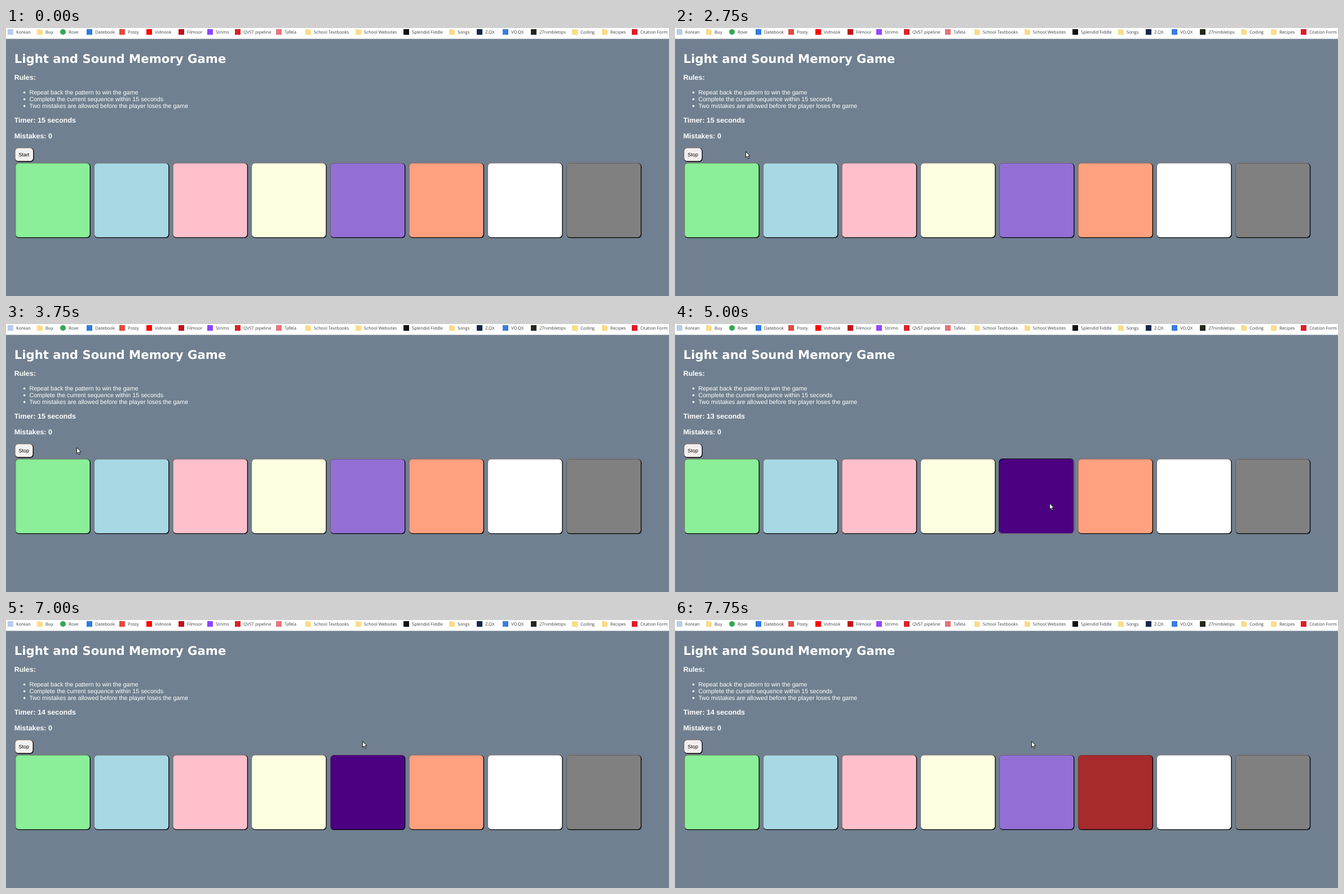
Write an HTML page that moves like this. It is 1176 px wide and 476 px high and loops after 8 s.

```html
<!DOCTYPE html>
<html lang="en">
<head>
<meta charset="utf-8">
<title>Memory Game</title>
<style>
  html, body { margin: 0; height: 100%; overflow: hidden; background: #708090; }
  svg { display: block; width: 1176px; height: 476px; }
  text { fill: #fff; text-rendering: geometricPrecision; white-space: pre; }
  .mark { font: 7.7px "Open Sans", "Noto Sans", sans-serif; fill: #3c4043; }
  .title { font: bold 21.24px "DejaVu Sans", sans-serif; }
  .head { font: bold 12.48px "Liberation Sans", Arial, sans-serif; }
  .rule { font: 10.72px "Liberation Sans", Arial, sans-serif; }
  .label { font: 8.89px "Liberation Sans", Arial, sans-serif; fill: #000; }
</style>
</head>
<body>
<svg id="stage" viewBox="0 0 1176 476"></svg>
<script>
const LOOP = 8000;
const stage = document.getElementById('stage');

function add(tag, attrs, text = '') {
  const el = document.createElementNS('http://www.w3.org/2000/svg', tag);
  for (const k in attrs) el.setAttribute(k, attrs[k]);
  el.textContent = text;
  return stage.appendChild(el);
}
const write = (cls, x, y, text) => add('text', { class: cls, x, y }, text);

// Button with a raised border; returns setters for its look.
function button(x, y, width, height, fill) {
  const edge = 1.33, light = '#767676', dark = '#000';
  const layer = (inset, shrink, rx, color) => add('rect', {
    x: x + inset, y: y + inset, width: width - shrink, height: height - shrink, rx, fill: color
  });
  const upper = layer(0, 0, 6.67);
  const lower = layer(edge, edge, 6);
  const face = layer(edge, 2 * edge, 5.34, fill);
  const press = down => {
    upper.setAttribute('fill', down ? dark : light);
    lower.setAttribute('fill', down ? light : dark);
  };
  const resize = w => [upper, lower, face].forEach((r, i) => r.setAttribute('width', w - edge * i));
  press(false);
  return { press, resize, paint: color => face.setAttribute('fill', color) };
}

// Bookmarks: label position, label, icon colour (none = folder), round icon
add('rect', { width: 1176, height: 19.3, fill: '#fff' });
[
  [18, 'Korean', '#b9cde6'], [70, 'Buy'], [111, 'Rove', '#34a853', 1],
  [158, 'Datebook', '#2f7de1'], [216, 'Posty', '#e04a3f'], [264, 'Vidnook', '#f00'],
  [321, 'Filmoor', '#c11119'], [372, 'Strimo', '#9146ff'], [421, 'QVST pipeline', '#d9222a'],
  [494, 'Tafela', '#e8737a'], [546, 'School Textbooks'], [635, 'School Websites'],
  [720, 'Splendid Fiddle', '#111'], [801, 'Songs'], [850, 'Z.QX', '#14264a'],
  [896, 'VO.QX', '#3c7de0'], [946, '27nimbletips', '#22281f'], [1019, 'Coding'],
  [1072, 'Recipes'], [1125, 'Citation Form', '#e3172a']
].forEach(([x, label, color, round]) => {
  if (color) add('rect', { x: x - 15, y: 2, width: 10, height: 10, rx: round ? 5 : 0, fill: color });
  else add('path', { d: `M${x - 14.5} 2.5h4l1 1h4v8.2h-9z`, fill: '#fbdc85', stroke: '#ecc865', 'stroke-width': .5 });
  write('mark', x, 9.8, label);
});

write('title', 14.7, 62, 'Light and Sound Memory Game');
write('head', 14.7, 92.3, 'Rules:');
[
  'Repeat back the pattern to win the game',
  'Complete the current sequence within 15 seconds',
  'Two mistakes are allowed before the player loses the game'
].forEach((line, i) => {
  add('circle', { cx: 32.7, cy: 114.6 + 12 * i, r: 1.8, fill: '#fff' });
  write('rule', 41.4, 117.9 + 12 * i, line);
});
const timer = write('head', 14.7, 168.3, '');
write('head', 14.7, 195.6, 'Mistakes: 0');

const starter = button(15, 212, 34.5, 25.7, '#f3f0f0');
const starterText = write('label', 22.6, 227.7, '');

const colors = ['#8aef98', '#a7d8e3', 'pink', '#ffffe2', '#946fd6', '#ffa17f', 'white', 'gray'];
const tiles = colors.map((c, i) => button(15.9 + 139.62 * i, 239, 134, 134, c));

const cursor = add('path', {
  d: 'M0 0V10.6L2.4 8.4L4.2 12.4L5.9 11.6L4.2 7.7H7.5Z',
  fill: '#fff', stroke: '#000', 'stroke-width': .9
});

// Each track holds its last value until the next time.
const pointer = [
  [0, -20, -20], [250, 288, 384], [500, 171, 331], [750, 166, 327], [1250, 44, 258],
  [1500, 32, 236], [1750, 25, 224], [2000, 28, 226], [2250, 107, 220], [2500, 123, 219],
  [2750, 125, 219], [4500, 473, 255], [4750, 664, 318], [5750, 632, 215]
];
const seconds = [[0, 15], [4000, 14], [4750, 13], [6000, 15], [7000, 14]];
const purple = [[0, 0], [3000, 1], [3750, 0], [5000, 2], [5500, 0], [6500, 1], [7250, 0]];
const at = (track, t) => track.findLast(step => step[0] <= t);

function draw(t) {
  const [, x, y] = at(pointer, t);
  cursor.setAttribute('transform', `translate(${x + .5} ${y + .5})`);
  timer.textContent = `Timer: ${at(seconds, t)[1]} seconds`;

  const running = t >= 2000;
  starterText.textContent = running ? 'Stop' : 'Start';
  starter.resize(running ? 33.9 : 34.5);

  const state = at(purple, t)[1];
  tiles[4].paint(state ? 'indigo' : colors[4]);
  tiles[4].press(state === 2);
  tiles[5].paint(t >= 7750 ? '#a72a2d' : colors[5]);
}

const begin = performance.now();
function frame() {
  draw((performance.now() - begin) % LOOP);
  requestAnimationFrame(frame);
}
frame();
</script>
</body>
</html>
```
